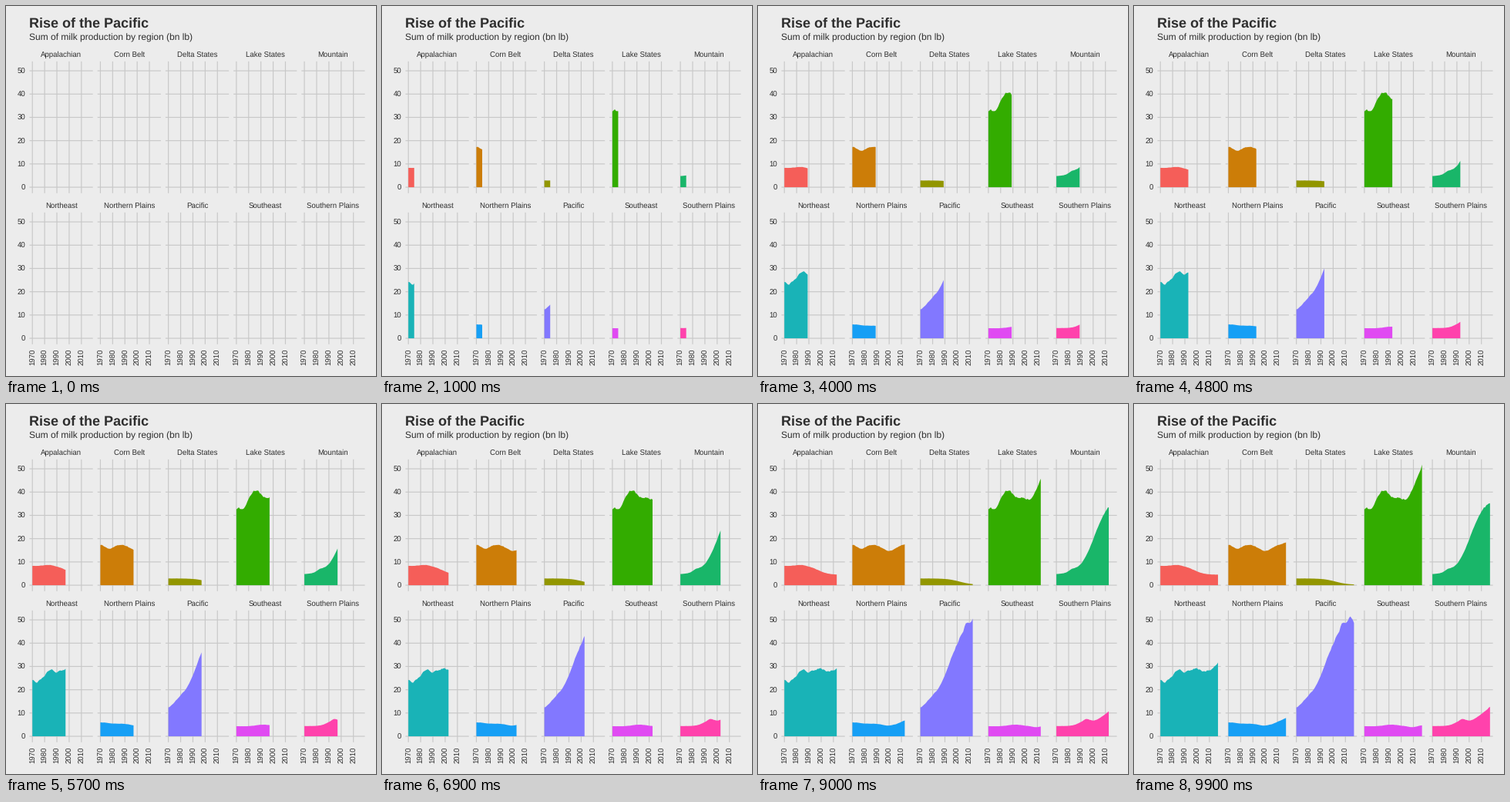
Recreate the animation shown at these times as a matplotlib script. Size 480x480 px, loop 10000 ms.

```python
import matplotlib.pyplot as plt
import numpy as np
from matplotlib.animation import FuncAnimation
from matplotlib.patches import Polygon

plt.rcParams["font.family"] = "Liberation Sans"
plt.rcParams["text.hinting"] = "none"
plt.rcParams["path.snap"] = False

SIZE, DPI = 480, 72
FRAMES, INTERVAL = 100, 100
SPAN = 47                       # years, 1970 to 2017
BG, GRID, INK = "#ececec", "#c8c8c8", "#2e2e2e"

# Panel geometry in pixels
COLS = 5
LEFT, TOP = 30.48, 71.9
WIDTH, HEIGHT = 82.22, 170.94
STEP_X, STEP_Y = 88.22, 196.0
PAD_X, PAD_Y = WIDTH / 22, HEIGHT / 22
PER_YEAR = (WIDTH - 2 * PAD_X) / SPAN
PER_UNIT = 3.02

rng = np.random.default_rng(7)
t = np.arange(SPAN + 1.0)

fig = plt.figure(figsize=(SIZE / DPI, SIZE / DPI), dpi=DPI, facecolor=BG)
ax = fig.add_axes([0, 0, 1, 1])
ax.set_xlim(0, SIZE)
ax.set_ylim(SIZE, 0)
ax.axis("off")


def step(mid, width):
    """Smooth rise from 0 to 1 around a year."""
    return 1 / (1 + np.exp((mid - t) / width))


def bump(mid, width):
    return np.exp(-((t - mid) / width) ** 2)


def ramp(start):
    return np.maximum(t - start, 0) ** 1.3


def label(x, y, text, size=9.6, **kw):
    ax.text(x, y, text, fontsize=size, color=INK, va="baseline", **kw)


def line(xs, ys):
    ax.plot(xs, ys, color=GRID, lw=1.16, solid_capstyle="butt", zorder=1)


class Panel:
    """One region: strip label, grid and a growing area."""

    def __init__(self, index, name, color, trend):
        row, col = divmod(index, COLS)
        left, top = LEFT + col * STEP_X, TOP + row * STEP_Y
        bottom = top + HEIGHT
        self.x0, self.y0 = left + PAD_X, bottom - PAD_Y
        self.values = trend * (1 + 0.005 * rng.standard_normal(t.size))

        label(left + WIDTH / 2, top - 5.8, name, ha="center")
        for v in range(0, 60, 10):
            y = self.y0 - v * PER_UNIT
            line([left, left + WIDTH], [y, y])
            if col == 0:
                label(25.2, y + 3.8, str(v), ha="right")
        for dy in range(0, 50, 10):
            x = self.x0 + dy * PER_YEAR
            line([x, x], [top, bottom])
            if row == 1:
                label(x + 3.5, 455, str(1970 + dy), ha="center",
                      rotation=90, rotation_mode="anchor")

        self.area = Polygon([(self.x0, self.y0)] * 3, fc=color, lw=0, zorder=2)
        ax.add_patch(self.area)

    def reveal(self, now):
        self.area.set_visible(now > 0)
        years = np.append(t[t < now], now)
        values = np.interp(years, t, self.values)
        xs = self.x0 + np.r_[0, years, now] * PER_YEAR
        ys = self.y0 - np.r_[0, values, 0] * PER_UNIT
        self.area.set_xy(np.column_stack([xs, ys]))


label(30.5, 28, "Rise of the Pacific", 18, weight="bold")
label(30.5, 45, "Sum of milk production by region (bn lb)", 12)

regions = [
    ("Appalachian", "#f55e59",
     8.3 - 3.8 * step(28, 4) + 0.5 * bump(14, 6)),
    ("Corn Belt", "#cc7d08",
     17.4 - 1.8 * bump(7.5, 4.5) - 2.7 * bump(30, 7) + 1.2 * step(45, 1.5)),
    ("Delta States", "#929600",
     2.9 - 2.7 * step(32, 5)),
    ("Lake States", "#33ac00",
     32.3 + bump(1.5, 1.5) + 4.4 * step(8.5, 1.2) + 4 * bump(16, 6)
     + 0.9 * bump(28, 3) + 0.53 * ramp(34)),
    ("Mountain", "#19b669",
     4.6 + 33 * step(31, 6) + 0.9 * bump(13, 4)),
    ("Northeast", "#19b3b7",
     24.3 + 4 * step(10, 1.6) - 1.4 * bump(3.5, 2) + 0.6 * bump(15, 2)
     - bump(19.5, 2) + bump(29, 2.5) - 0.5 * bump(35, 2) + 0.25 * ramp(40)),
    ("Northern Plains", "#169ff5",
     6 - 0.6 * step(6, 2) - 0.8 * bump(29, 6) + 0.1 * ramp(35)),
    ("Pacific", "#8278ff",
     10.5 + 42.5 * step(24, 7.5) + 1.5 * bump(9, 6) + 2 * bump(37, 1.5)
     + 1.3 * bump(44, 2) - 0.55 * ramp(44)),
    ("Southeast", "#e04af2",
     4.3 + 0.7 * bump(22, 8) - 0.4 * bump(39, 4) + 0.4 * step(44, 1)),
    ("Southern Plains", "#ff42ac",
     4.4 + 2.4 * step(18, 2.5) + 0.8 * bump(24.5, 3) + 0.16 * ramp(31)),
]
panels = [Panel(i, *region) for i, region in enumerate(regions)]


def update(i):
    for p in panels:
        p.reveal(SPAN * i / (FRAMES - 1))


anim = FuncAnimation(fig, update, frames=FRAMES, interval=INTERVAL,
                     repeat=True, repeat_delay=0, blit=False)
plt.show()
```
